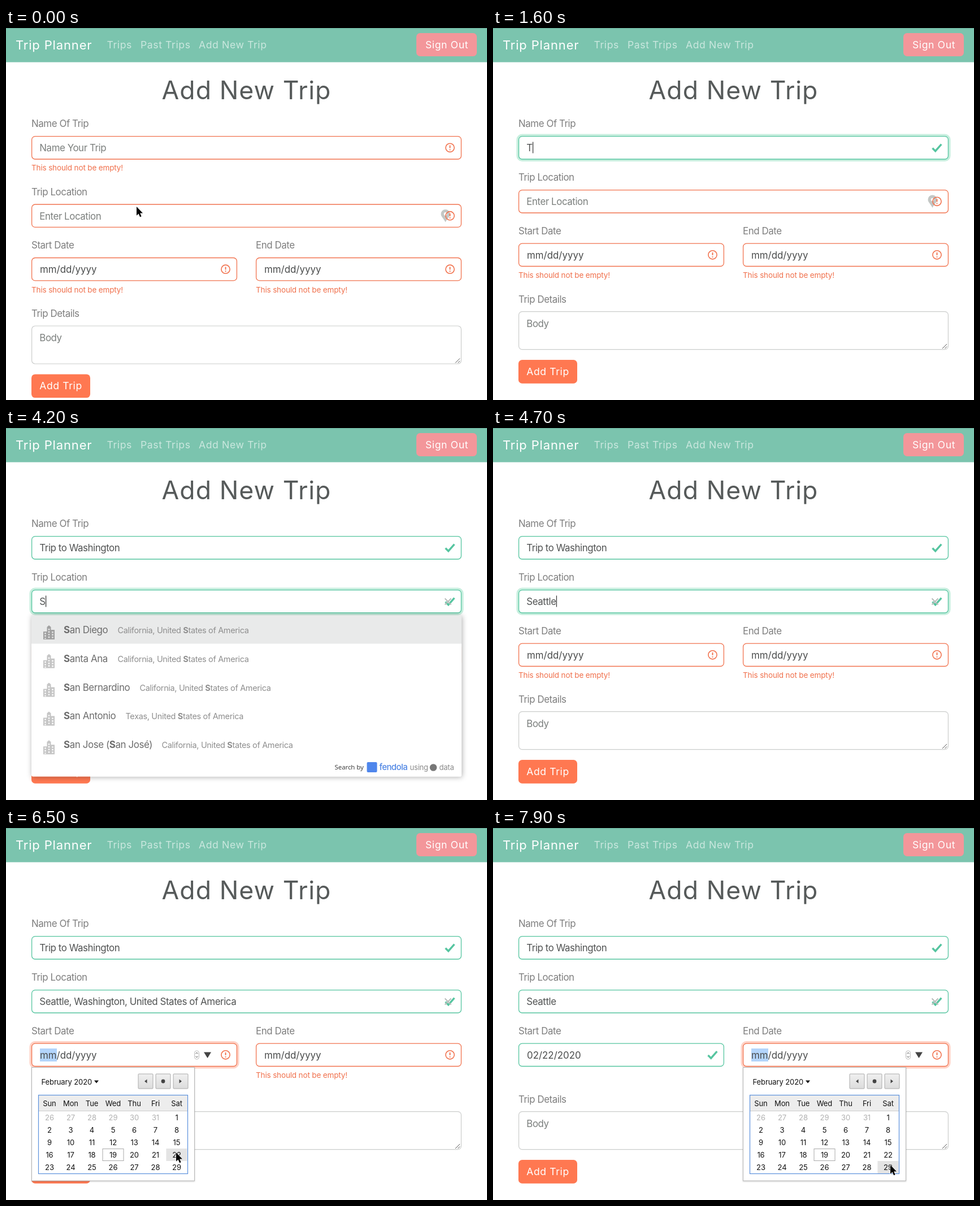
Animation of 851 by 658 pixels, one loop 8000 ms. Source, as an HTML page:

```html
<!DOCTYPE html>
<html lang="en">
<head>
<meta charset="utf-8">
<title>Add New Trip</title>
<style>
html, body { margin: 0; width: 100%; height: 100%; overflow: hidden; background: #fff; }
svg { display: block; width: 851px; height: 658px; }
text { font-family: Inter, "Liberation Sans", sans-serif; white-space: pre; }
.title { font-size: 44.5px; letter-spacing: 1.1px; fill: #565a5a; }
.brand { font-size: 22px; letter-spacing: .85px; fill: #fff; }
.nav { font-size: 17.6px; letter-spacing: .6px; fill: #fff; }
.link { opacity: .6; }
.label, .hint, .value { font-size: 16.9px; letter-spacing: -.44px; fill: #7e7e7e; }
.hint { fill: #7b7f7d; }
.value { fill: #505252; }
.date { font-size: 16.9px; fill: #4a4c4c; }
.error { font-size: 13.5px; letter-spacing: -.15px; fill: #f0704c; }
.city { font-size: 16.9px; letter-spacing: -.4px; fill: #6c6c6c; }
.area { font-size: 14.4px; letter-spacing: -.3px; fill: #8e8e8e; }
.cal { font-size: 13px; letter-spacing: -.1px; fill: #111; }
.mid { text-anchor: middle; }
.bold { font-weight: 700; }
</style>
</head>
<body>
<svg id="stage" viewBox="0 0 851 658"></svg>
<script>
const NS = 'http://www.w3.org/2000/svg';
const stage = document.getElementById('stage');
const RED = '#f1734f', GREEN = '#56c5a0', LOOP = 8000, SHIFT = 25.4, COL = 397;

function el(parent, tag, attrs = {}, text) {
  const node = document.createElementNS(NS, tag);
  for (const k in attrs) node.setAttribute(k, attrs[k]);
  if (text !== undefined) node.textContent = text;
  parent.appendChild(node);
  return node;
}
const set = (node, attrs) => { for (const k in attrs) node.setAttribute(k, attrs[k]); };
const show = (node, on) => node.setAttribute('display', on ? 'inline' : 'none');
const group = (parent, x = 0, y = 0) => el(parent, 'g', { transform: `translate(${x} ${y})` });
const rect = (parent, x, y, width, height, attrs) => el(parent, 'rect', { x, y, width, height, ...attrs });
const path = (parent, d, attrs) => el(parent, 'path', { d, ...attrs });
const label = (parent, x, y, cls, str) => el(parent, 'text', { x, y, class: cls }, str);
const put = (node, str) => { if (node.textContent !== str) node.textContent = str; };

// Text with *bold* parts
function rich(parent, x, y, cls, str) {
  const node = label(parent, x, y, cls);
  str.split('*').forEach((s, i) => s && el(node, 'tspan', i % 2 ? { class: 'bold' } : {}, s));
}

const defs = el(stage, 'defs');
defs.innerHTML = `
  <filter id="drop" x="-10%" y="-10%" width="120%" height="125%">
    <feDropShadow dx="1" dy="1" stdDeviation="5" flood-color="#000" flood-opacity=".32"/>
  </filter>
  <filter id="soft" x="-5%" y="-5%" width="110%" height="112%">
    <feDropShadow dx="0" dy="1" stdDeviation="1" flood-color="#000" flood-opacity=".2"/>
  </filter>
  <linearGradient id="btn" x2="0" y2="1">
    <stop stop-color="#f0f0f0"/><stop offset="1" stop-color="#dcdcdc"/>
  </linearGradient>`;

// Page
rect(stage, 0, 0, 851, 60.5, { fill: '#7bc4ae' });
rect(stage, 0, 0, 851, 1, { fill: '#68a896' });
label(stage, 17, 37.5, 'brand', 'Trip Planner');
label(stage, 178.5, 35.5, 'nav link', 'Trips');
label(stage, 238, 35.5, 'nav link', 'Past Trips');
label(stage, 341, 35.5, 'nav link', 'Add New Trip');
rect(stage, 726, 9, 107, 41, { rx: 6.5, fill: '#f3969a' });
label(stage, 780, 35.5, 'nav mid', 'Sign Out');
label(stage, 425.5, 125.5, 'title mid', 'Add New Trip');

// Input with border, focus ring, state icon and caret; y is the top of the box
function input(parent, x, y, w, name, cls) {
  const g = group(parent, x, y);
  label(g, 0, -15.8, 'label', name);
  const ring = rect(g, -1.5, -1.5, w + 3, 44.5, { rx: 8, fill: 'none', 'stroke-width': 4 });
  const box = rect(g, .6, .6, w - 1.2, 40.4, { rx: 6, fill: '#fff', 'stroke-width': 1.3 });
  const mark = rect(g, 15, 9.5, 30, 23, { fill: '#b3d5fb' });
  const text = label(g, cls === 'date' ? 15 : 14.3, 27.2, cls, '');
  const under = group(g);
  const bad = group(g, w - 20.5, 20.8);
  el(bad, 'circle', { r: 7.6, fill: 'none', stroke: RED, 'stroke-width': 1.6 });
  path(bad, 'M0 -4.2V.8M0 2.6V4.5', { stroke: RED, 'stroke-width': 1.9 });
  const good = path(g, `M${w - 28.5} 21.5l5.2 5.2l10.6 -12`, { fill: 'none', stroke: GREEN, 'stroke-width': 3.4 });
  const over = group(g);
  const caret = rect(g, 14, 10.5, 1.2, 20, { fill: '#333' });
  return { g, under, over, update(s) {
    const color = s.valid ? GREEN : RED;
    set(box, { stroke: color });
    set(ring, { stroke: s.valid ? '#56cc9d' : '#ff7851', opacity: .32 * s.ring });
    show(bad, !s.valid);
    show(good, s.valid);
    show(mark, s.mark);
    put(text, s.text || s.hint);
    text.setAttribute('class', cls === 'date' ? cls : s.text ? 'value' : 'hint');
    show(caret, s.caret);
    if (s.caret) caret.setAttribute('x', 14 + (s.text ? text.getComputedTextLength() + .6 : 0));
  } };
}

const nameError = label(stage, 45, 252.3, 'error', 'This should not be empty!');
const trip = input(stage, 45, 191, 761, 'Name Of Trip', 'value');
const lower = group(stage);
const place = input(lower, 45, 286, 761, 'Trip Location', 'value');
const pin = path(place.under, 'M732.5 32C729 25 724.5 22 724.5 17.5a8 8 0 0 1 16 0C740.500 22 736 25 732.5 32ZM729.700 17.500a2.800 2.800 0 0 0 5.600 0a2.800 2.800 0 0 0 -5.600 0Z',
  { fill: '#c3c7c5', 'fill-rule': 'evenodd' });
const clear = path(place.over, 'M731.5 15.5l11 11m0 -11l-11 11', { stroke: '#b9bdbb', 'stroke-width': 2 });

function dateInput(x, name) {
  const f = input(lower, x, 380.5, 364, name, 'date');
  const error = label(f.g, 0, 61.8, 'error', 'This should not be empty!');
  const tools = group(f.g);
  rect(tools, 288.5, 13.5, 8, 15, { rx: 4, fill: '#fff', stroke: '#bbb' });
  path(tools, 'M290.500 19l2 -2.500l2 2.500M290.500 23l2 2.500l2 -2.500', { fill: 'none', stroke: '#555' });
  path(tools, 'M305 16h13l-6.500 10.500Z', { fill: '#444' });
  return { update(s) {
    f.update(s);
    show(error, !s.valid);
    show(tools, s.tools);
  } };
}
const start = dateInput(45, 'Start Date');
const end = dateInput(45 + COL, 'End Date');

label(lower, 45, 485.6, 'label', 'Trip Details');
rect(lower, 45.6, 501.6, 759.800, 67, { rx: 6, fill: '#fff', stroke: '#cbcdcc', 'stroke-width': 1.2 });
label(lower, 59.3, 528.5, 'hint', 'Body');
path(lower, 'M795 567l8 -8M799.500 567l3.500 -3.500', { stroke: '#555' });
rect(lower, 45, 587, 104, 41.7, { rx: 6.5, fill: '#ff7851' });
label(lower, 97, 613.6, 'nav mid', 'Add Trip');

// Suggestions
function suggestions(rows) {
  const g = group(stage);
  rect(g, 45, 331, 761, 285.5, { rx: 3, fill: '#fff', filter: 'url(#drop)' });
  rect(g, 45, 331, 761, 50.5, { fill: '#e9eaea' });
  rows.forEach(([city, area, x], i) => {
    const row = group(g, 0, 331 + i * 50.8);
    path(row, 'M66 43V29h6.500V21l3.500 -3l3.500 3V26h6.500V43Z', { fill: i ? '#c6c6c6' : '#a2a2a2' });
    path(row, 'M69.500 31V42M76 24V42M82.500 29V42', { stroke: i ? '#fff' : '#e9eaea', 'stroke-width': 2.4, 'stroke-dasharray': '2.4 2.2' });
    rich(row, 102, 32, 'city', city);
    rich(row, x, 32, 'area', area);
  });
  el(g, 'text', { x: 581.5, y: 604, style: 'font:11.4px "Open Sans",sans-serif', fill: '#333' }, 'Search by');
  rect(g, 638.5, 591, 18, 18, { rx: 2, fill: '#4f86ec' });
  el(g, 'text', { x: 660.5, y: 605, 'font-size': 15, 'font-weight': 500, 'letter-spacing': -.6, fill: '#4f86e4' }, 'fendola');
  el(g, 'text', { x: 714.5, y: 604.5, 'font-size': 13, 'letter-spacing': -.2, fill: '#8a8a8a' }, 'using');
  el(g, 'circle', { cx: 756, cy: 600.5, r: 6.3, fill: '#777' });
  el(g, 'text', { x: 766.5, y: 604.5, 'font-size': 13, 'letter-spacing': -.2, fill: '#8a8a8a' }, 'data');
  return g;
}
const us = s => s + ', United *S*tates of America';
const listS = suggestions([
  ['*S*an Diego', us('California'), 197.5],
  ['*S*anta Ana', us('California'), 197.5],
  ['*S*an Bernardino', us('California'), 236.5],
  ['*S*an Antonio', us('Texas'), 211.5],
  ['*S*an Jose (*S*an José)', us('California'), 275.5]
]);
const wash = 'Washington, United States of America';
const listSeattle = suggestions([
  ['*Seattle*', wash, 181],
  ['*Seattle* Hill', wash, 209],
  ['*Seattle* Heights', wash, 243],
  ['*Seattle* Lake', wash, 219],
  ['*Seattle* Park', wash, 218]
]);

// Date picker
function calendar(x) {
  const g = group(stage, x, 0);
  rect(g, 45.5, 423.5, 288, 200.500, { fill: '#fff', stroke: '#b6b6b6', filter: 'url(#soft)' });
  label(g, 62.5, 453.8, 'cal', 'February 2020');
  path(g, 'M156 446.500h8l-4 5Z', { fill: '#111' });
  for (let i = 0; i < 3; i++) rect(g, 234 + i * 31, 435, 26, 26, { rx: 1, fill: 'url(#btn)', stroke: '#aaa' });
  path(g, 'M249.500 444.500v7l-4.500 -3.500ZM306.500 444.500v7l4.500 -3.500Z', { fill: '#444' });
  el(g, 'circle', { cx: 278, cy: 448, r: 3.4, fill: '#444' });
  rect(g, 57.5, 472.5, 264, 139, { fill: '#fff' });
  rect(g, 58, 473, 263, 27, { fill: '#ededed' });
  path(g, 'M58 500.500H321', { stroke: '#ccc' });
  const hover = rect(g, 0, 0, 37.5, 22, { fill: '#e4e4e4' });
  rect(g, 57.5, 472.5, 264, 139, { fill: 'none', stroke: '#5a90dc', 'stroke-width': 1.2 });
  rect(g, 171, 567.5, 37, 21, { fill: '#fff', stroke: '#aaa' });
  'Sun Mon Tue Wed Thu Fri Sat'.split(' ').forEach((d, i) => label(g, 77 + i * 37.5, 492.2, 'cal mid', d));
  for (let i = 0; i < 35; i++) {
    const n = label(g, 77 + i % 7 * 37.5, 516.7 + Math.floor(i / 7) * 22, 'cal mid', i < 6 ? 26 + i : i - 5);
    if (i < 6) n.style.fill = '#b0b0b0';
  }
  return { update(on, mx, my) {
    show(g, on);
    const c = Math.floor((mx - x - 58.2) / 37.5), r = Math.floor((my - 501) / 22);
    show(hover, on && c >= 0 && c < 7 && r >= 0 && r < 5);
    set(hover, { x: 58.2 + c * 37.5 + (c === 0 ? 0 : .2), y: 501 + r * 22, width: c === 6 ? 37 : 37.5 });
  } };
}
const calStart = calendar(0), calEnd = calendar(COL);

const mouse = path(stage, 'M0 0V15.800L3.600 12.500L6.100 18.300L8.600 17.200L6.200 11.600H11Z',
  { fill: '#000', stroke: '#fff', 'stroke-width': 1.2, 'stroke-linejoin': 'round', 'paint-order': 'stroke' });

// Timeline
const TRACK = [
  [100, 231, 316], [500, 205, 213], [5000, 205, 213], [5900, 190, 356], [6000, 190, 356],
  [6200, 354, 400], [6300, 354, 400], [6500, 301, 574], [6750, 301, 574],
  [7150, 751, 400], [7350, 751, 400], [7800, 703, 596]
];
const FOCUS = { trip: 400, place: 3700, start: 6250, end: 7300 };
const OPEN_START = 6300, PICK = 6700, OPEN_END = 7400;

function mouseAt(t) {
  let a = TRACK[0];
  for (const b of TRACK) {
    if (t < b[0]) {
      const k = Math.max(0, (t - a[0]) / (b[0] - a[0] || 1)), e = k * k * (3 - 2 * k);
      return [a[1] + (b[1] - a[1]) * e, a[2] + (b[2] - a[2]) * e];
    }
    a = b;
  }
  return a.slice(1);
}

function typedName(t) {
  const first = Math.min(8, Math.floor((t - 1600) / 100) + 1);
  const n = t < 1600 ? 0 : t < 2500 ? first : t < 2800 ? 9 : 10 + Math.floor((t - 2800) / 100);
  return 'Trip to Washington'.slice(0, n);
}

function typedPlace(t) {
  if (t >= 6000 && t < PICK) return 'Seattle, Washington, United States of America';
  const n = [4000, 4300, 4350, 4400, 4450, 4500, 4700].filter(k => t >= k).length;
  return 'Seattle'.slice(0, n);
}

const fade = (t, on, off) => Math.max(0, Math.min(1, (t - on) / 150, 1 - (t - off) / 150));
const blink = (t, from) => (t - from) % 1000 < 500;
const within = (t, a, b) => t >= a && t < b;

function draw(t) {
  const [mx, my] = mouseAt(t);
  const named = t >= 1600, placed = t >= 4000, picked = t >= PICK;
  const over = x => within(mx, x, x + 364) && within(my, 381, 422) && t > 6000;
  set(lower, { transform: `translate(0 ${named ? 0 : SHIFT})` });
  show(nameError, !named);
  trip.update({
    valid: named, hint: 'Name Your Trip', text: typedName(t), ring: fade(t, FOCUS.trip, FOCUS.place),
    caret: within(t, FOCUS.trip, FOCUS.place) && (within(t, 1600, 3700) || blink(t, FOCUS.trip))
  });
  const last = t < 4000 ? 3700 : t < 4300 ? 4000 : t < 4700 ? 4300 : t < 6000 ? 4700 : 6000;
  place.update({
    valid: placed, hint: 'Enter Location', text: typedPlace(t), ring: fade(t, FOCUS.place, FOCUS.start),
    caret: within(t, FOCUS.place, FOCUS.start) && blink(t, last)
  });
  show(pin, !placed);
  show(clear, placed);
  const onStart = within(t, FOCUS.start, FOCUS.end), onEnd = t >= FOCUS.end;
  start.update({
    valid: picked, text: picked ? '02/22/2020' : 'mm/dd/yyyy', ring: fade(t, FOCUS.start, FOCUS.end),
    mark: onStart && !picked, tools: onStart || over(45)
  });
  end.update({
    valid: false, text: 'mm/dd/yyyy', ring: fade(t, FOCUS.end, LOOP + 200),
    mark: onEnd, tools: onEnd || over(45 + COL)
  });
  show(listS, within(t, 4100, 4300));
  show(listSeattle, within(t, 4800, 6000));
  calStart.update(within(t, OPEN_START, PICK), mx, my);
  calEnd.update(t >= OPEN_END, mx, my);
  show(mouse, t < 1600 || t >= 5100);
  set(mouse, { transform: `translate(${mx} ${my})` });
}

const t0 = performance.now();
function tick(now) {
  draw(Math.max(0, now - t0) % LOOP);
  requestAnimationFrame(tick);
}
draw(0);
requestAnimationFrame(tick);
</script>
</body>
</html>
```
